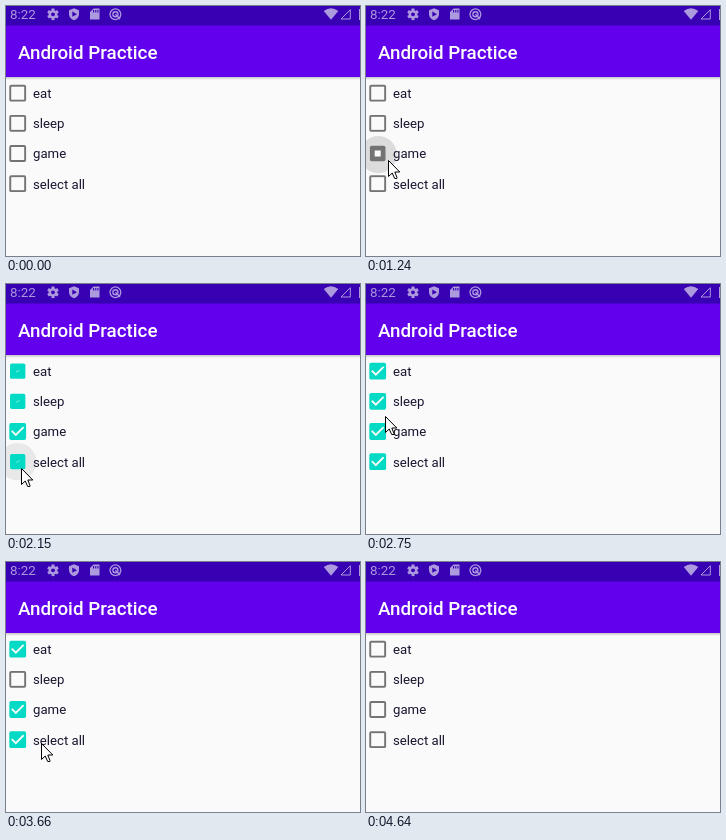
Animation of 354x250 px, one loop 5400 ms. Source, as an HTML page with a canvas:

```html
<!DOCTYPE html>
<html lang="en">
<head>
<meta charset="utf-8">
<title>Checkbox practice</title>
<style>
  html, body { margin: 0; width: 100%; height: 100%; overflow: hidden; background: #fafafa; }
  canvas { display: block; }
</style>
</head>
<body>
<canvas id="stage" width="354" height="250"></canvas>
<script>
const ctx = document.getElementById('stage').getContext('2d');
const LOOP = 5400, REFRESH = 75, PHASE = 45, TOGGLE = 280;
const TEAL = '#03dac5', GREY = '#737373', PAPER = '#fafafa';
const STATUS = '#3700b3', ICON = '#ad99de';
const BOX_X = 11.7, rowY = i => 87.2 + 30.15 * i;
const labels = ['eat', 'sleep', 'game', 'select all'];

// The pointer eases along curved legs and rests in between.
const game = [15, 153], sleep = [16, 118], all = [9, 177], aside = [48, 148];
const legs = [
  { start: 200, end: 760, from: [146, 238], via: [60, 180], to: game },
  { start: 1100, end: 1550, from: game, via: [70, 161], to: all },
  { start: 1960, end: 2900, from: all, via: [40, 220], to: sleep },
  { start: 3110, end: 3270, from: sleep, via: [32, 133], to: aside },
  { start: 3270, end: 4100, from: aside, via: [36, 205], to: [8, 174] },
  { start: 4260, end: 4620, from: [8, 174], via: [60, 200], to: [174, 248] }
];

const presses = [
  { row: 2, down: 990, up: 1100, color: '#000', toggles: [2] },
  { row: 3, down: 1800, up: 1960, color: '#000', toggles: [0, 1, 3] },
  { row: 1, down: 2880, up: 3110, color: TEAL, toggles: [1] },
  { row: 3, down: 4060, up: 4165, color: TEAL, toggles: [0, 2, 3] }
];

const clamp = v => Math.max(0, Math.min(1, v));
const mix = (a, b, k) => a + (b - a) * k;
const smooth = k => k * k * (3 - 2 * k);

function pointerAt(t) {
  const { start, end, from, via, to } = legs.findLast(leg => leg.start <= t);
  const k = smooth(clamp((t - start) / (end - start)));
  return from.map((a, i) => mix(mix(a, via[i], k), mix(via[i], to[i], k), k));
}

// 0 is empty, 1 is ticked; every press that concerns the row moves it to the other state.
const checkedAt = (row, t) => presses
  .filter(press => press.toggles.includes(row))
  .reduce((p, press) => mix(p, 1 - p, clamp((t - press.up) / TOGGLE)), 0);

function rect(x, y, w, h, color) {
  ctx.fillStyle = color;
  ctx.fillRect(x, y, w, h);
}

function shape(path, fill, stroke, width = 1) {
  const p = new Path2D(path);
  if (fill) { ctx.fillStyle = fill; ctx.fill(p); }
  if (stroke) { ctx.strokeStyle = stroke; ctx.lineWidth = width; ctx.stroke(p); }
}

function disc(x, y, r, color) {
  ctx.beginPath();
  ctx.arc(x, y, r, 0, 7);
  ctx.fillStyle = color;
  ctx.fill();
}

function text(str, x, y, font, color) {
  ctx.font = font + ' Roboto, sans-serif';
  ctx.fillStyle = color;
  ctx.fillText(str, x, y);
}

function drawStatusBar() {
  rect(0, 0, 354, 19.5, STATUS);
  text('8:22', 4, 13, '13.4px', ICON);

  // Gear
  for (let i = 0; i < 6; i++) {
    ctx.save();
    ctx.translate(47, 8.3);
    ctx.rotate(i * Math.PI / 3);
    rect(-1.5, -5.8, 3, 4, ICON);
    ctx.restore();
  }
  disc(47, 8.3, 4.3, ICON);
  disc(47, 8.3, 1.9, STATUS);

  // Shield
  shape('M68 2.3L73 4.3V8Q73 12.6 68 14.3Q63 12.6 63 8V4.3Z', ICON);
  shape('M66.3 5.6L71 8.2L66.3 10.8Z', STATUS);

  // Memory card
  shape('M87.5 2.5H93.5V13.5H84V6Z', ICON);
  for (let i = 0; i < 3; i++) rect(87 + 2.2 * i, 4, 1.1, 2.5, STATUS);

  // Ring with a tail
  disc(109.4, 8.3, 6, ICON);
  disc(109.4, 8.3, 4.7, STATUS);
  disc(109.4, 8.3, 3.2, ICON);
  disc(109.4, 8.3, 1.8, STATUS);
  shape('M109.4 8.3L114 13', null, ICON, 1.3);

  // Signal strength
  shape('M317.7 5Q325 -.5 332.3 5L325 13.7Z', ICON);
  shape('M335 13L344.3 3.7V13Z', null, ICON);
  rect(353, 3, 1, 11, ICON);
}

function drawAppBar() {
  const shadow = ctx.createLinearGradient(0, 71, 0, 74);
  shadow.addColorStop(0, 'rgba(0,0,0,.22)');
  shadow.addColorStop(1, 'rgba(0,0,0,0)');
  rect(0, 71, 354, 3, shadow);
  rect(0, 19, 354, 52, '#6200ee');
  text('Android Practice', 12, 53, '500 18.8px', '#fff');
}

function drawRipple({ row, down, up, color }, t) {
  const fade = 1 - clamp((t - up - 100) / 200);
  if (t <= down || fade <= 0) return;
  const [x, y] = pointerAt(down);
  const k = clamp((t - down) / 225);
  ctx.globalAlpha = .12 * fade * clamp((t - down) / 90);
  disc(mix(x, BOX_X, k), mix(y, rowY(row), k), 18.7 * (1 - (1 - k) ** 3), color);
  ctx.globalAlpha = 1;
}

// The outline closes into a solid square, then the tick grows out of it.
function drawCheckbox(y, p) {
  ctx.save();
  ctx.translate(BOX_X, y);
  const scale = 1 - .1 * Math.sin(Math.PI * p);
  ctx.scale(scale, scale);
  ctx.beginPath();
  ctx.roundRect(-8.4, -8.4, 16.8, 16.8, 1.9);
  ctx.fillStyle = p < .5 ? GREY : TEAL;
  ctx.fill();
  if (p < .5) {
    const hole = 13 * (1 - 2 * p);
    rect(-hole / 2, -hole / 2, hole, hole, PAPER);
  } else if (p > .5) {
    const grow = 2 * p - 1;
    ctx.scale(grow, grow);
    shape('M-5.9 -.6L-1.9 3.4L5.9 -4.4', null, PAPER, 1.9);
  }
  ctx.restore();
}

function drawPointer(t) {
  if (t < legs[0].start || t >= legs.at(-1).end) return;
  const [x, y] = pointerAt(t);
  ctx.save();
  ctx.translate(Math.round(x) + .5, Math.round(y) + .5);
  shape('M0 0V16L3.7 12.5L6.2 18H8.4V16.8L6.3 11.5H11.3Z', '#fff', '#000');
  ctx.restore();
}

function draw(t) {
  rect(0, 0, 354, 250, PAPER);
  drawAppBar();
  drawStatusBar();
  presses.forEach(press => drawRipple(press, t));
  labels.forEach((label, i) => {
    drawCheckbox(rowY(i), checkedAt(i, t));
    text(label, 27, rowY(i) + 4.9, '13.2px', '#1a1530');
  });
  drawPointer(t);
}

// The screen is refreshed in steps rather than continuously.
function tick() {
  const now = performance.now() % LOOP;
  draw(Math.floor((now - PHASE) / REFRESH) * REFRESH + PHASE);
  requestAnimationFrame(tick);
}
tick();
</script>
</body>
</html>
```
